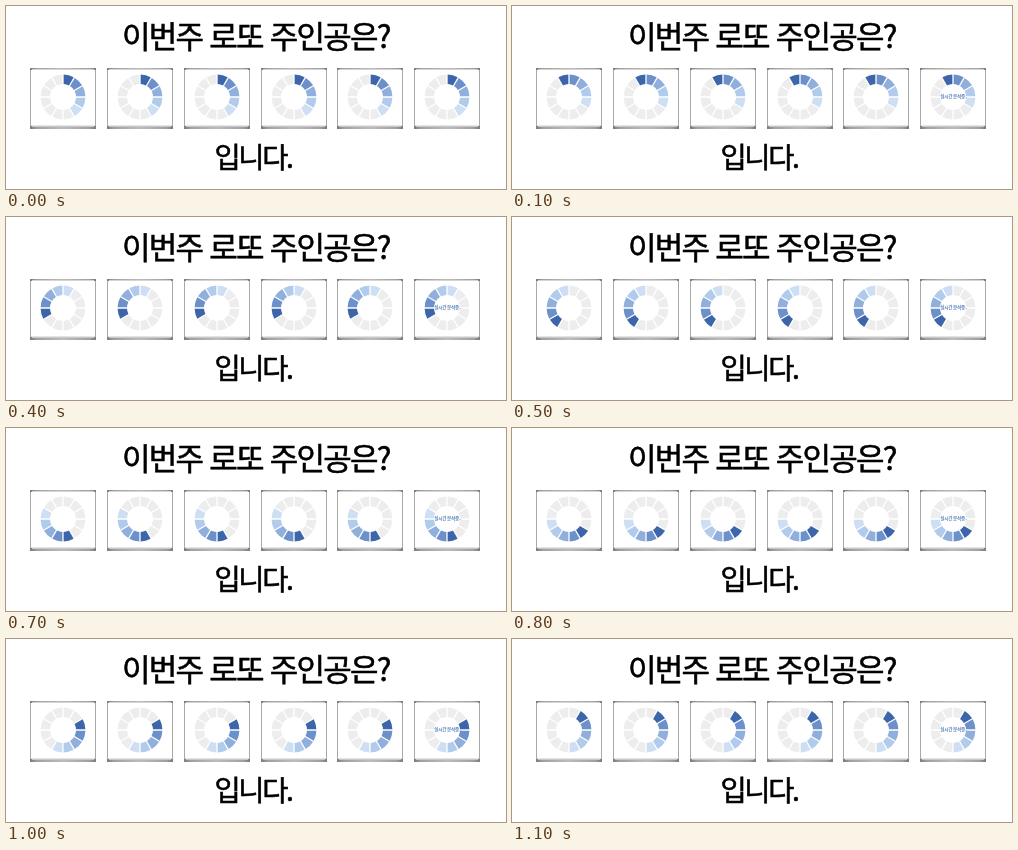
Write an HTML page that moves like this. It is 500x183 px and loops after 1200 ms.

```html
<!DOCTYPE html>
<html lang="ko">
<head>
<meta charset="utf-8">
<style>
  html, body { margin: 0; width: 100%; height: 100%; overflow: hidden; background: #fff; }
  svg { display: block; width: 500px; height: 183px; }
  text { font-family: "Noto Sans CJK KR", "Noto Sans CJK", "Noto Sans KR", sans-serif; }
  .title { stroke: #000; stroke-width: .55px; }
</style>
</head>
<body>
<svg id="stage" viewBox="0 0 500 183">
  <defs>
    <linearGradient id="rail">
      <stop offset="0" stop-color="#777"/>
      <stop offset=".1" stop-color="#a0a0a0"/>
      <stop offset=".5" stop-color="#bcbcbc"/>
      <stop offset=".9" stop-color="#a0a0a0"/>
      <stop offset="1" stop-color="#777"/>
    </linearGradient>
  </defs>
  <text class="title" x="116" y="41.7" font-size="31" letter-spacing="-1.75">이번주 로또 주인공은?</text>
  <text class="title" x="208.5" y="162.2" font-size="28.5" letter-spacing="-2.4">입니다.</text>
</svg>
<script>
const STEP = 100, COUNT = 12, BOXES = 6, PITCH = 76.75;
const INNER = 13, OUTER = 22.4, GAP = 0.65;
const TAIL = ["#3c65aa", "#6b90ca", "#90afdd", "#b1cbec", "#cfdff3"];
const IDLE = "#ededed";
const stage = document.getElementById("stage");

function add(parent, tag, attrs) {
  const node = document.createElementNS("http://www.w3.org/2000/svg", tag);
  for (const key in attrs) node.setAttribute(key, attrs[key]);
  return parent.appendChild(node);
}

// Ring wedge whose straight edges keep a constant gap to its neighbours.
function wedge(index) {
  const from = index * Math.PI / 6, to = from + Math.PI / 6;
  const point = (r, a) => `${(r * Math.sin(a)).toFixed(2)} ${(-r * Math.cos(a)).toFixed(2)}`;
  const o = GAP / OUTER, i = GAP / INNER;
  return `M${point(OUTER, from + o)}A${OUTER} ${OUTER} 0 0 1 ${point(OUTER, to - o)}` +
    `L${point(INNER, to - i)}A${INNER} ${INNER} 0 0 0 ${point(INNER, from + i)}Z`;
}

function frame(x) {
  const bar = (dx, y, width, height, fill) =>
    add(stage, "rect", { x: x + dx, y, width, height, fill });
  bar(0, 62, 66, 61, "#a8a8a8");
  bar(1, 63, 64, 59, "#fff");
  bar(0, 62, 66, 1, "url(#rail)");
  bar(1, 63, 64, 1, "#d4d4d4");
  bar(1, 119, 64, 1, "#e4e4e4");
  bar(1, 120, 64, 1, "#c8c8c8");
  bar(0, 121, 66, 2, "url(#rail)");
  for (const dx of [0, 64]) {
    bar(dx, 62, 2, 2, "#808080");
    bar(dx, 120, 2, 3, "#808080");
  }
}

const rings = Array.from({ length: BOXES }, (_, box) => {
  const offset = Math.ceil(box * PITCH);
  frame(24 + offset);
  const ring = add(stage, "g", { transform: `translate(${57 + offset} 91)` });
  return Array.from({ length: COUNT }, (_, i) => add(ring, "path", { d: wedge(i) }));
});

const caption = add(stage, "text", {
  x: 428.3, y: 92.3, "font-size": 4.6, "font-weight": 700, fill: "#5b86bd", "letter-spacing": -0.3
});
caption.textContent = "실시간 분석중..";

function draw(time) {
  const step = Math.floor(time / STEP) % COUNT;
  for (const ring of rings) {
    ring.forEach((part, i) => part.setAttribute("fill", TAIL[(i + step) % COUNT] || IDLE));
  }
  caption.setAttribute("visibility", step ? "visible" : "hidden");
}

const start = performance.now();
function tick() {
  draw(performance.now() - start);
  requestAnimationFrame(tick);
}
tick();
</script>
</body>
</html>
```
